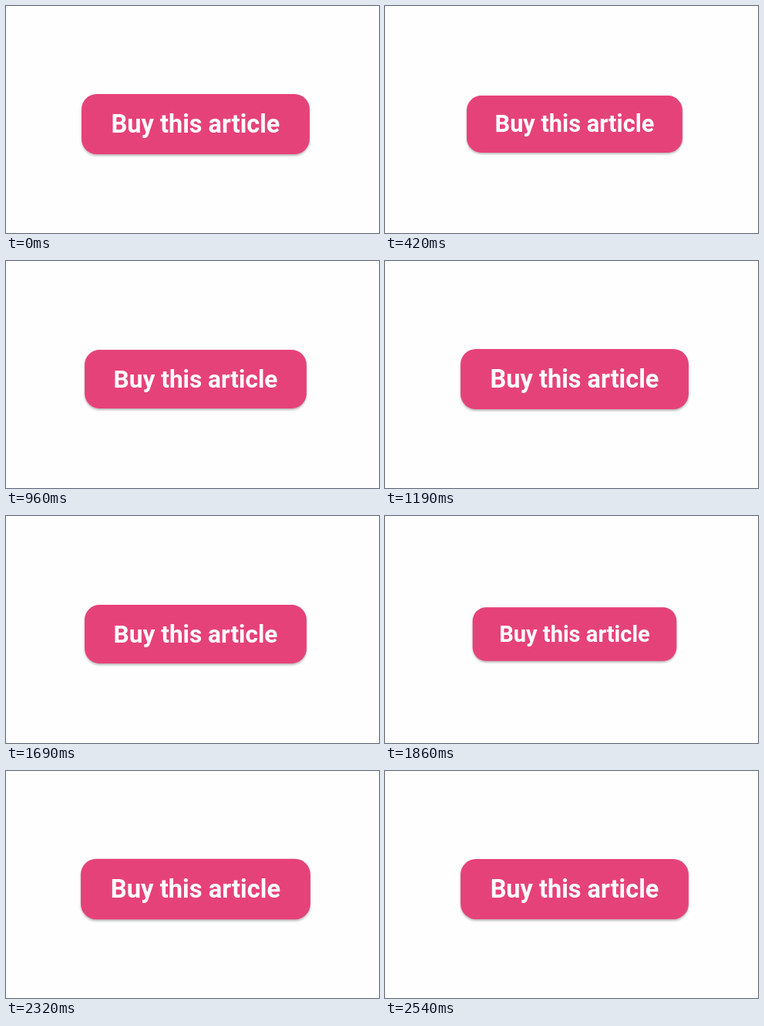
An HTML page for the animation above (2990 ms loop, 484 by 294 pixels).

```html
<!DOCTYPE html>
<html lang="en">
<head>
<meta charset="utf-8">
<title>Springy button</title>
<style>
  html, body { margin: 0; width: 100%; height: 100%; overflow: hidden; background: #fefefe; }
  #button {
    position: absolute; left: 98px; top: 114px; width: 296px; height: 78px;
    border-radius: 20px; background: #e6427a; color: #fff;
    box-shadow: 0 2px 3px rgba(0, 0, 0, .28);
    font: bold 32.5px/78px Roboto, sans-serif; text-align: center; white-space: nowrap;
    user-select: none;
  }
</style>
</head>
<body>
<div id="button">Buy this article</div>
<script>
  const LOOP = 2990, STEP = 100 / 3, FIRST = 20, DEPTH = 0.1;
  const presses = [[0, 365], [520, 872], [1648, 2165]]; // [down, up] in ms
  const STIFFNESS = 550, DAMPING = 30;
  const decay = DAMPING / 2, freq = Math.sqrt(STIFFNESS - decay * decay);
  const button = document.getElementById('button');

  // Response of an underdamped spring to a unit step, ms after the step.
  function spring(ms) {
    if (ms <= 0) return 0;
    const s = ms / 1000;
    return 1 - Math.exp(-decay * s) * (Math.cos(freq * s) + decay / freq * Math.sin(freq * s));
  }

  function scaleAt(t) {
    const tick = t < FIRST ? 0 : FIRST + Math.floor((t - FIRST) / STEP) * STEP;
    const pressed = presses.reduce((sum, [down, up]) => sum + spring(tick - down) - spring(tick - up), 0);
    return 1 - DEPTH * pressed;
  }

  function draw() {
    button.style.transform = `scale(${scaleAt(performance.now() % LOOP)})`;
    requestAnimationFrame(draw);
  }
  draw();
</script>
</body>
</html>
```
